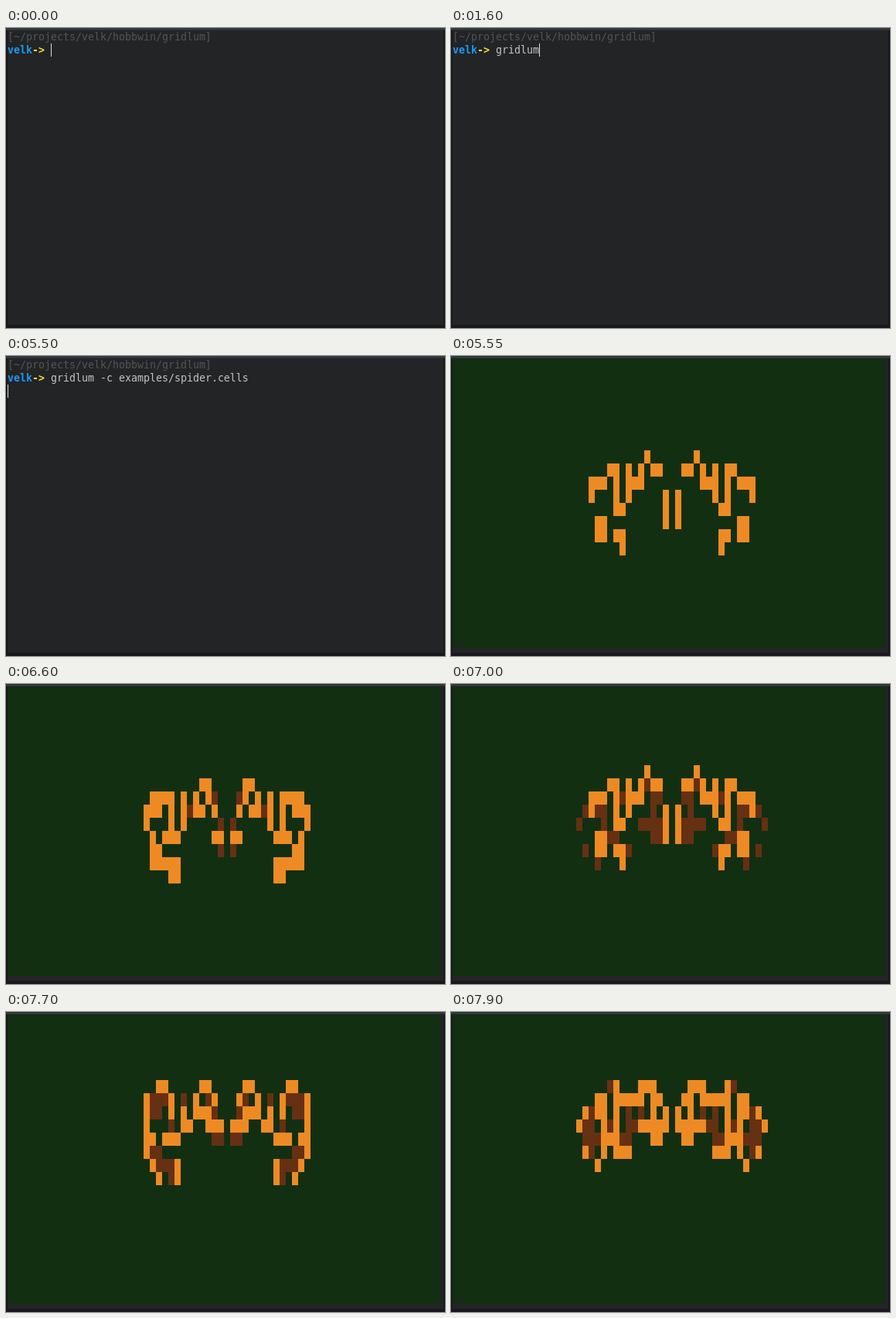
Animation of 568 by 388 pixels, one loop 8 s. Source, as an HTML page with a canvas:

```html
<!DOCTYPE html>
<html lang="en">
<head>
<meta charset="utf-8">
<title>Terminal life</title>
<style>
  html, body { margin: 0; width: 100%; height: 100%; overflow: hidden; background: #222426; }
  #stage { position: relative; width: 568px; height: 388px; overflow: hidden; background: #222426; }
  #frame { position: absolute; inset: 0; box-sizing: border-box; border: solid #17181b; border-width: 0 2px 4px 2px; }
  #bar { position: absolute; left: 0; top: 0; width: 568px; height: 3px; background: #31373c; }
  .line {
    position: absolute; left: 2px; height: 17px; white-space: pre; color: #c3c5c6;
    font: 13.29px/17px "DejaVu Sans Mono", monospace;
  }
  #path { top: 3px; color: #545454; }
  #prompt { top: 20px; }
  .user { color: #1d99f3; }
  .arrow { color: #fadc3c; }
  #cursor { position: absolute; width: 1px; height: 17px; background: #dcdcdc; }
  #board { position: absolute; left: 2px; top: 3px; }
</style>
</head>
<body>
<div id="stage">
  <div id="frame"></div>
  <div id="bar"></div>
  <div class="line" id="path">[~/projects/velk/hobbwin/gridlum]</div>
  <div class="line" id="prompt"><b class="user">velk</b><b class="arrow">-&gt;</b> <span id="typed"></span></div>
  <div id="cursor"></div>
  <canvas id="board" width="560" height="374"></canvas>
</div>
<script>
const LOOP = 8000, ENTER = 5500, OPEN = 5550, RUN = 6600, TICK = 100;
const COLS = 70, ROWS = 22, CELL_W = 8, CELL_H = 17;
const COMMAND = 'gridlum -c examples/spider.cells ';

// [time, characters visible]
const KEYS = [
  [0, 0], [350, 1], [500, 2], [600, 3], [800, 4], [1250, 5], [1400, 6], [1600, 7],
  [1800, 8], [2100, 9], [2250, 10], [2550, 11], [3250, 12], [3500, 13], [3800, 20],
  [4500, 21], [4600, 22], [4850, 33]
];

// Left half of the spaceship; the right half mirrors it around an empty column.
const SPIDER = [
  '.........O...',
  '...OO.O.O.OO.',
  'OOO.O.OOO....',
  'O...O.O.....O',
  '....OO......O',
  '.OO.........O',
  '.OO.OO.......',
  '.....O.......'
];

const byId = id => document.getElementById(id);
const board = byId('board'), cursor = byId('cursor'), typed = byId('typed');
const ctx = board.getContext('2d');

function seed() {
  const cells = new Uint8Array(COLS * ROWS);
  SPIDER.forEach((half, row) => {
    const full = half + '.' + [...half].reverse().join('');
    [...full].forEach((c, col) => { cells[(row + 7) * COLS + col + 22] = +(c === 'O'); });
  });
  return cells;
}

function evolve(cells) {
  return cells.map((alive, i) => {
    const x = i % COLS, y = Math.floor(i / COLS);
    let sum = -alive;
    for (let dy = -1; dy <= 1; dy++)
      for (let dx = -1; dx <= 1; dx++)
        sum += cells[(y + dy + ROWS) % ROWS * COLS + (x + dx + COLS) % COLS];
    return +(sum === 3 || (alive && sum === 2));
  });
}

const generations = [seed()];
while (generations.length < 15) generations.push(evolve(generations.at(-1)));

function drawBoard(n) {
  const now = generations[n], before = generations[Math.max(0, n - 1)];
  ctx.fillStyle = '#122f12';
  ctx.fillRect(0, 0, board.width, board.height);
  now.forEach((alive, i) => {
    if (!alive && !before[i]) return;
    ctx.fillStyle = alive ? '#ee8a23' : '#663012';
    ctx.fillRect(i % COLS * CELL_W, Math.floor(i / COLS) * CELL_H, CELL_W, CELL_H);
  });
}

function drawShell(t) {
  const count = KEYS.findLast(([time]) => time <= t)[1];
  typed.textContent = COMMAND.slice(0, count);
  const entered = t >= ENTER;
  cursor.style.left = (entered ? 2 : 58 + count * CELL_W) + 'px';
  cursor.style.top = (entered ? 37 : 20) + 'px';
}

function render(t) {
  const running = t >= OPEN;
  board.style.visibility = running ? 'visible' : 'hidden';
  cursor.style.visibility = running ? 'hidden' : 'visible';
  if (running) drawBoard(t < RUN ? 0 : 1 + Math.floor((t - RUN) / TICK));
  else drawShell(t);
}

const start = performance.now();
function loop() {
  render((performance.now() - start) % LOOP);
  requestAnimationFrame(loop);
}
loop();
</script>
</body>
</html>
```
